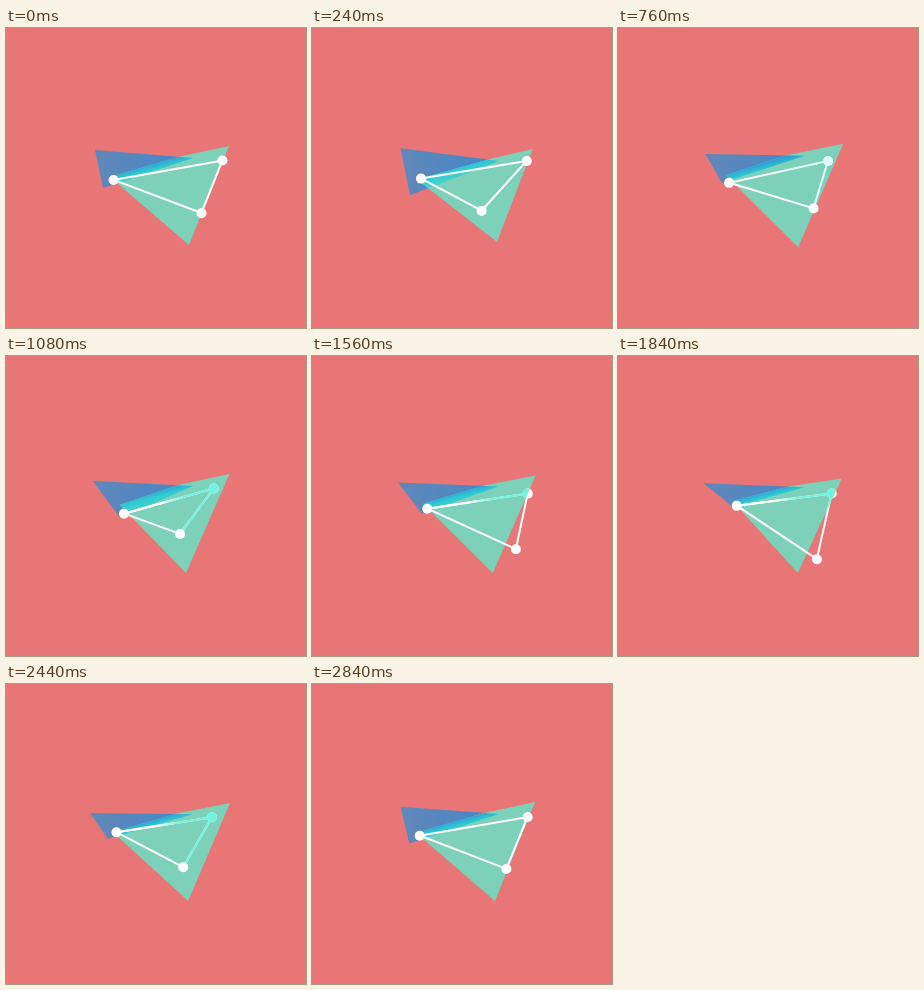
An HTML page without scripts that plays this animation: 300x300 px, repeating every 2880 ms.

```html
<!DOCTYPE html>
<html lang="en">
<head>
<meta charset="utf-8">
<title>Folding triangles</title>
<style>
/* Five loop-driven amounts; every corner below is a formula of them. */
@property --hit { syntax: "<number>"; inherits: true; initial-value: 0; }
@property --fold { syntax: "<number>"; inherits: true; initial-value: 0; }
@property --lift { syntax: "<number>"; inherits: true; initial-value: 0; }
@property --drift { syntax: "<number>"; inherits: true; initial-value: 0; }
@property --sway { syntax: "<number>"; inherits: true; initial-value: 0; }
@property --r { syntax: "<length>"; inherits: false; initial-value: 0px; }
@property --len { syntax: "<length>"; inherits: false; initial-value: 0px; }

@keyframes hit { 0%, 37%, 100% { --hit: 0 } 16.7% { --hit: 1 } 25% { --hit: -.4 } }
@keyframes fold { 0%, 17%, 100% { --fold: 0 } 37.5% { --fold: .75 } 54% { --fold: .55 } 72% { --fold: 1 } 85% { --fold: .2 } }
@keyframes lift { 0%, 46%, 100% { --lift: 0 } 54% { --lift: .2 } 72% { --lift: 1 } 85% { --lift: .15 } }
@keyframes drift { 0%, 100% { --drift: 0 } 85% { --drift: 1 } }
@keyframes sway { 0%, 100% { --sway: .72 } 37.5% { --sway: 0 } 54% { --sway: 1 } 72% { --sway: .7 } 85% { --sway: .1 } }
@keyframes tint { 0%, 24%, 100% { opacity: 0 } 37.5%, 88% { opacity: 1 } }
@keyframes spark {
  0%, 11% { --r: 30px; --len: 0px }
  16.7% { --r: 46px; --len: 10px }
  20.8% { --r: 54px; --len: 6px }
  24%, 100% { --r: 61px; --len: 0px }
}

html, body { margin: 0; width: 100%; height: 100%; overflow: hidden; background: #e87676; }
.stage, .stage * { position: absolute; top: 0; left: 0; }
.stage, .layer { width: 300px; height: 300px; }

.stage {
  --ease: cubic-bezier(.4, .25, .6, .75);
  animation: 2880ms var(--ease) infinite;
  animation-name: hit, fold, lift, drift, sway;
  animation-timing-function: var(--ease), var(--ease), var(--ease), linear, var(--ease);

  /* blue triangle: left, tip, bottom */
  --blue: polygon(
    calc(89px - 5px * var(--drift)) calc(122px + 7px * var(--drift) - 5px * var(--hit)),
    187px calc(130px + 6px * var(--hit) + 2px * var(--lift)),
    calc(97px + 23px * var(--fold) + 2px * var(--hit))
    calc(160px + 15px * var(--hit) - 15px * var(--lift) + 5px * var(--fold) - 4px * var(--drift)));

  /* green sheet: right, crease, left, bottom */
  --green: polygon(
    calc(223px - 5px * var(--hit) + 1px * var(--drift)) calc(118px + 6px * var(--hit) + 7px * var(--lift)),
    calc(172px + 12px * var(--hit)) calc(129px + 4px * var(--hit) + 2px * var(--lift)),
    calc(104px + 13px * var(--fold) + 2px * var(--hit))
    calc(149px + 5px * var(--hit) - 6px * var(--lift)),
    calc(183px - 4px * var(--fold) + 4px * var(--hit)) calc(217px - 6px * var(--hit)));

  /* wire joints */
  --ax: calc(107.5px + 14px * var(--fold) + 3px * var(--hit));
  --ay: calc(152px + 10px * var(--fold) - 4px * var(--drift) - 11px * var(--lift) - 2px * var(--hit));
  --bx: calc(210px + 9px * var(--sway) - 5px * var(--drift));
  --by: calc(132.5px + 8px * var(--sway) * var(--drift));
  --cx: calc(174px + 30px * var(--sway) - 44px * var(--hit));
  --cy: calc(178px + 10px * var(--sway) + 26px * var(--lift) - 2px * var(--hit));
}

.blue { clip-path: var(--blue); }
.green { clip-path: var(--green); }
.blue.fill { background: linear-gradient(90deg, #5f87ba 95px, #4288c8 187px); }
.green.fill { background: #7cd1b8; }
.green.mix { background: linear-gradient(165deg, #2f96d4 167px, #2fcbd3 175px, #5ed6c2 190px); }

.ab { --x: var(--ax); --y: var(--ay); --u: var(--bx); --v: var(--by); }
.bc { --x: var(--bx); --y: var(--by); --u: var(--cx); --v: var(--cy); }
.ca { --x: var(--cx); --y: var(--cy); --u: var(--ax); --v: var(--ay); }
.line {
  width: hypot(var(--u) - var(--x), var(--v) - var(--y));
  height: 1.8px;
  margin-top: -.9px;
  background: #fff;
  transform-origin: 0 50%;
  transform: translate(var(--x), var(--y)) rotate(atan2(var(--v) - var(--y), var(--u) - var(--x)));
}
.dot {
  width: 10px; height: 10px;
  margin: -5px;
  border-radius: 50%;
  background: #fff;
  transform: translate(var(--x), var(--y));
}
.tint { animation: tint 2880ms infinite; }
.tint * { background: #74f2dd; }
.tint .ab.line { background: linear-gradient(90deg, #fff 40%, #74f2dd 65%); }

/* sparks fan out from the left joint with slowly widening gaps */
.spark {
  --a: calc(84deg + 31deg * var(--i) + 1.5deg * var(--i) * var(--i));
  width: var(--len); height: 1.7px;
  background: #fff;
  transform-origin: 0 50%;
  transform: translate(115px, 142px) rotate(var(--a)) translateX(var(--r));
  animation: spark 2880ms linear infinite;
}
</style>
</head>
<body>
<div class="stage">
  <div class="layer blue fill"></div>
  <div class="layer green fill"></div>
  <div class="layer blue"><div class="layer green mix"></div></div>

  <div class="line ab"></div>
  <div class="line bc"></div>
  <div class="line ca"></div>
  <div class="dot bc"></div>
  <div class="layer green">
    <div class="layer tint" >
      <div class="line ab"></div>
      <div class="line bc"></div>
      <div class="dot bc"></div>
    </div>
  </div>
  <div class="dot ab"></div>
  <div class="dot ca"></div>

  <div class="spark" style="--i:0"></div>
  <div class="spark" style="--i:1"></div>
  <div class="spark" style="--i:2"></div>
  <div class="spark" style="--i:3"></div>
  <div class="spark" style="--i:4"></div>
  <div class="spark" style="--i:5"></div>
  <div class="spark" style="--i:6"></div>
  <div class="spark" style="--i:7"></div>
</div>
</body>
</html>
```
